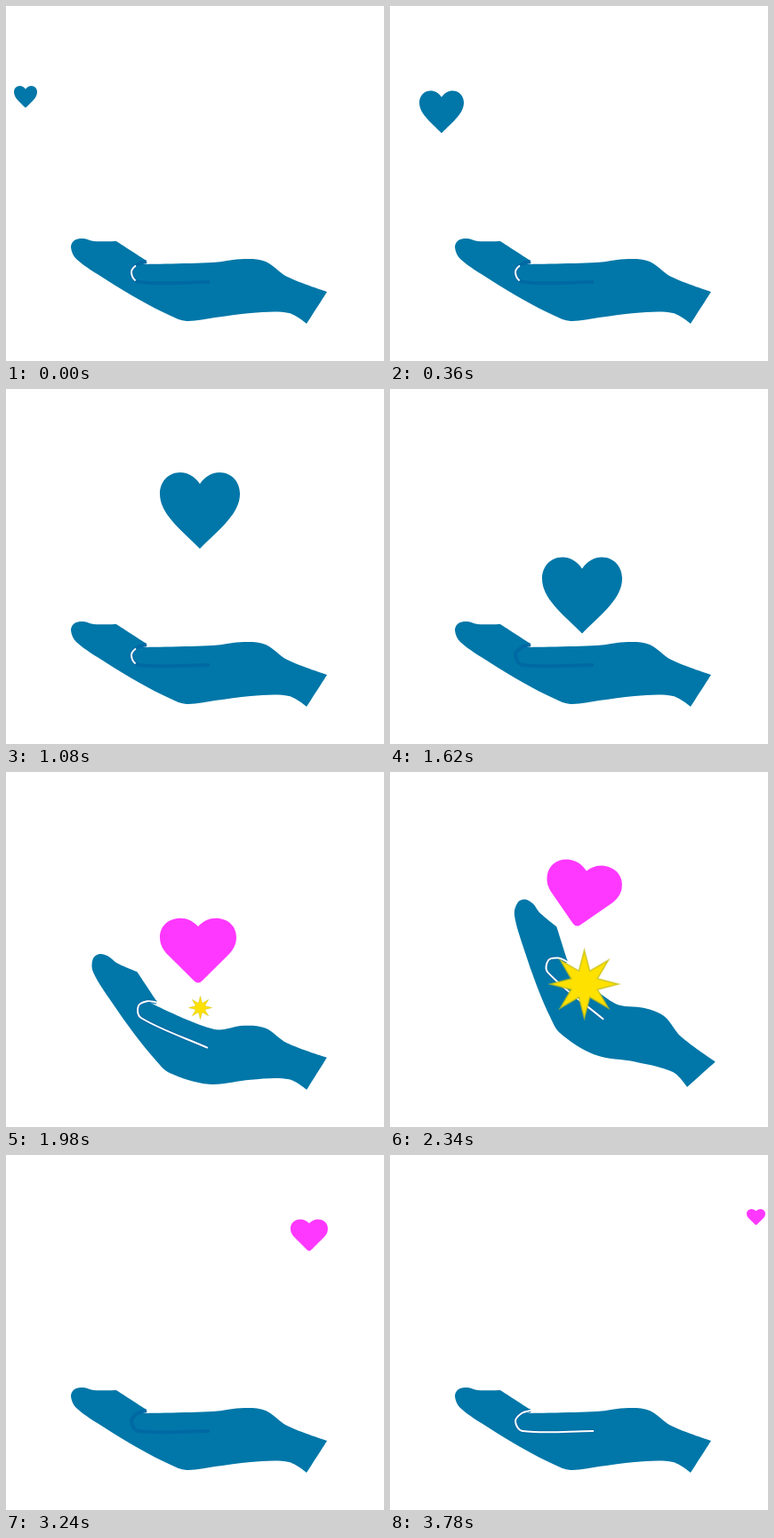
Animation of 425x400 px, one loop 4080 ms. Source, as an HTML page with a canvas:

```html
<!DOCTYPE html>
<html lang="en">
<head>
<meta charset="utf-8">
<title>Heart and hand</title>
<style>
  html, body { margin: 0; width: 100%; height: 100%; overflow: hidden; background: #fff; }
  canvas { display: block; }
</style>
</head>
<body>
<canvas id="stage" width="425" height="400"></canvas>
<script>
const ctx = document.getElementById('stage').getContext('2d');
const BLUE = '#0077a8', DARK = '#0069a4', PINK = '#ff38ff', YELLOW = '#ffe100';
const LOOP = 4080, STEP = 180, LAST = 21;
const HIT = 11, PEAK = 13, REST = 18;

// Resting hand: fingertips, thumb, wrist, then back along the underside.
const HAND = [[73,272], [77,264], [87,262], [99,265], [124,265], [158,287], [148,291], [232,289],
  [268,285], [292,288], [316,305], [361,322], [338,358], [318,346], [275,346], [235,351],
  [203,355], [185,349], [150,331], [112,308], [79,285]];
const CORNERS = [4, 5, 6, 11, 12];
const CREASE = [[158,288], [148,291], [141,300], [149,311], [229,311]];
const KNUCKLE = [235, 301], WRIST = [347, 342];

const clamp = (v, lo = 0, hi = 1) => Math.max(lo, Math.min(hi, v));

function turn([x, y], [cx, cy], angle) {
  const c = Math.cos(angle), s = Math.sin(angle), dx = x - cx, dy = y - cy;
  return [cx + dx * c - dy * s, cy + dx * s + dy * c];
}

// The fingers fold at the knuckle, fading out over the palm; then the hand tips at the wrist.
function bend(points, fold, tip) {
  return points.map(p => turn(turn(p, KNUCKLE, fold * clamp((250 - p[0]) / 45)), WRIST, tip));
}

function spline(pts, closed, corners = []) {
  const n = pts.length;
  const at = i => closed ? pts[(i + n) % n] : pts[clamp(i, 0, n - 1)];
  const dir = i => {
    if (corners.includes(i % n)) return [0, 0];
    const a = at(i - 1), b = at(i + 1);
    const len = Math.hypot(b[0] - a[0], b[1] - a[1]);
    return [(b[0] - a[0]) / len, (b[1] - a[1]) / len];
  };
  ctx.beginPath();
  ctx.moveTo(...pts[0]);
  for (let i = 0; i < (closed ? n : n - 1); i++) {
    const p = at(i), q = at(i + 1), d = dir(i), e = dir(i + 1);
    const r = Math.hypot(q[0] - p[0], q[1] - p[1]) / 3;
    ctx.bezierCurveTo(p[0] + d[0] * r, p[1] + d[1] * r, q[0] - e[0] * r, q[1] - e[1] * r, ...q);
  }
  if (closed) ctx.closePath();
}

function drawHand(n) {
  const struck = n >= HIT && n < REST;
  const fold = n < REST ? .42 * clamp((n - HIT + 1.45)) : 0;
  const tip = struck ? .34 - .14 * Math.abs(n - PEAK - .5) : 0;

  spline(bend(HAND, fold, tip), true, CORNERS);
  ctx.fillStyle = BLUE;
  ctx.fill();

  spline(bend(CREASE, fold, tip), false);
  ctx.lineWidth = 4;
  ctx.strokeStyle = DARK;
  ctx.stroke();

  // The crease opens fully, or only around the thumb tip.
  const open = n === LAST || struck && n < PEAK + 2;
  if (open || struck || n < 7) {
    ctx.setLineDash(open ? [] : [20, 999]);
    ctx.lineDashOffset = -13;
    ctx.lineWidth = 2;
    ctx.strokeStyle = '#fff';
    ctx.stroke();
    ctx.setLineDash([]);
  }
}

const slimHeart = new Path2D(
  'M0 13C6 4 14 0 22 0C36 0 45 11 45 24C45 46 24 62 0 86C-24 62 -45 46 -45 24C-45 11 -36 0 -22 0C-14 0 -6 4 0 13Z');
const roundHeart = new Path2D(
  'M0 6C4 2 8 0 13 0C22 0 28 6 28 14C28 19 26 23 22 27L3 46Q0 49 -3 46L-22 27C-26 23 -28 19 -28 14C-28 6 -22 0 -13 0C-8 0 -4 2 0 6Z');

// Drift in, drop onto the palm, then fly off and shrink.
function heartAt(n) {
  if (n <= 6) return {
    x: 22 + 18 * n + 22 * Math.max(0, n - 2),
    top: 90 + n * 2 / 3 + 21 * Math.sin(Math.PI * (n / 6) ** 2.5),
    width: Math.min(90, 26 + 12 * n),
    tilt: 0
  };
  if (n < HIT) {
    const k = n - 6;
    return { x: 216, top: 94 + 42 * k - 3.4 * k * k, width: 90, tilt: 0 };
  }
  const k = n - 16, before = Math.max(0, -k);
  return {
    x: Math.max(216, 292 + 24.8 * k - .18 * k * k),
    top: 80 - 3.8 * k + .2 * before ** 3.6,
    width: Math.min(86, 56 - 7 * k + 2.7 * before),
    tilt: .18 * clamp(1 - Math.abs(n - PEAK) / 2)
  };
}

function drawHeart(n) {
  const { x, top, width, tilt } = heartAt(n);
  const pink = n >= HIT;
  const [w, h] = pink ? [56, 48] : [90, 86];
  const s = width / w;
  ctx.save();
  ctx.translate(x, top + h * s / 2);
  ctx.rotate(tilt);
  ctx.scale(s, s);
  ctx.translate(0, -h / 2);
  ctx.fillStyle = pink ? PINK : BLUE;
  ctx.fill(pink ? roundHeart : slimHeart);
  ctx.restore();
}

function drawStar(n) {
  if (n < HIT || n >= REST) return;
  const off = Math.abs(n - PEAK);
  const x = 218.5, y = 239 + 13.3 * off;
  const r = 38 - off * (n > PEAK ? 8 : 12.5);
  ctx.beginPath();
  for (let i = 0; i < 16; i++) {
    const a = i * Math.PI / 8, d = i % 2 ? r * .42 : r;
    ctx.lineTo(x + d * Math.sin(a), y - d * Math.cos(a));
  }
  ctx.closePath();
  ctx.fillStyle = YELLOW;
  ctx.fill();
  ctx.lineWidth = r / 22;
  ctx.strokeStyle = 'rgba(195, 190, 20, .7)';
  ctx.stroke();
}

function draw(now) {
  const n = Math.min(LAST, Math.floor((now % LOOP) / STEP));
  ctx.fillStyle = '#fff';
  ctx.fillRect(0, 0, 425, 400);
  drawHand(n);
  drawStar(n);
  drawHeart(n);
}

let start;
function tick(now) {
  start ??= now;
  draw(Math.max(0, now - start));
  requestAnimationFrame(tick);
}
draw(0);
requestAnimationFrame(tick);
</script>
</body>
</html>
```
